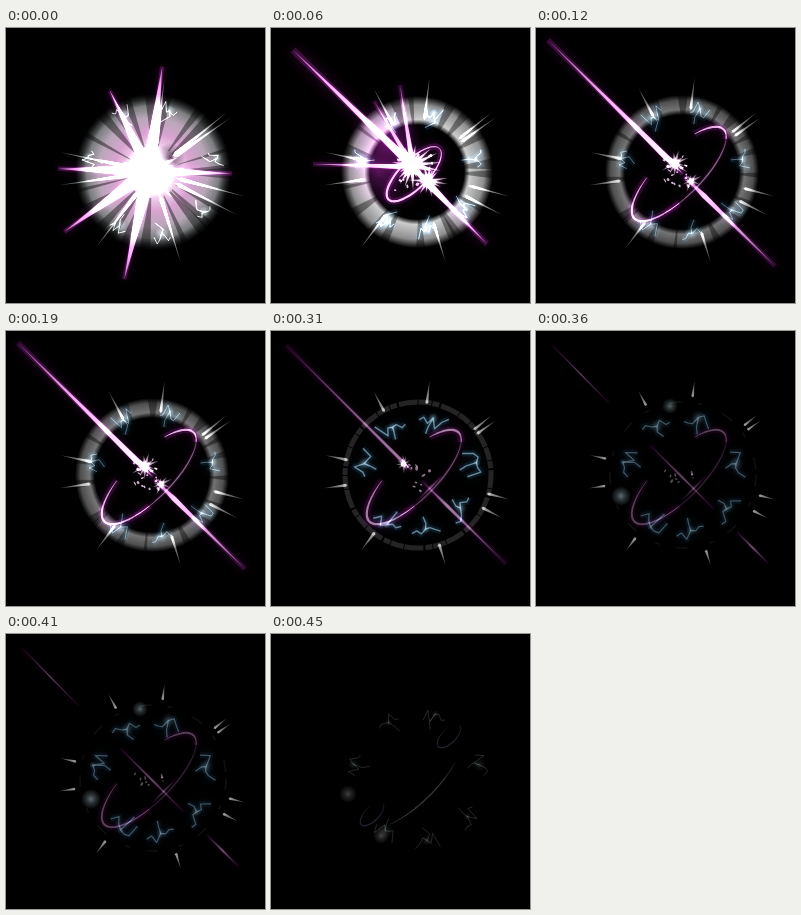
An HTML page with a canvas for the animation above (540 ms loop, 259 by 275 pixels).

```html
<!DOCTYPE html>
<html>
<head>
<meta charset="utf-8">
<title>Energy burst</title>
<style>
html, body { margin: 0; width: 100%; height: 100%; overflow: hidden; background: #000; }
canvas { display: block; width: 259px; height: 275px; }
</style>
</head>
<body>
<canvas id="stage" width="259" height="275"></canvas>
<script>
const c = document.getElementById('stage').getContext('2d');
const TAU = Math.PI * 2, CX = 147, CY = 144;
const LOOP = 540, STARTS = [0, 60, 120, 240, 360, 450];
const WHITE = '255,255,255', PALE = '255,232,252', PINK = '225,120,215';
const PURPLE = '120,25,120', BLUE = '35,85,120', STEEL = '185,215,225', GREY = '150,150,155';
const NEEDLES = [-83, -118, -39, -35, 15, 27, 73, 127, 172, 192];
const BOLTS = [-118, -75, -168, -12, 38, 82, 122];
let seed = 1;

const rnd = () => (seed = (seed * 16807) % 2147483647) / 2147483647;
const jit = s => (rnd() - 0.5) * s;
const rgba = (rgb, a) => `rgba(${rgb},${a})`;
const polar = (deg, r) => [CX + r * Math.cos(deg * TAU / 360), CY + r * Math.sin(deg * TAU / 360)];

function glow(rgb, size, a) {
  c.shadowColor = rgba(rgb, a);
  c.shadowBlur = size;
}

function radial(x, y, r, stops) {
  const g = c.createRadialGradient(x, y, 0, x, y, r);
  for (const [at, rgb, a] of stops) g.addColorStop(at, rgba(rgb, a));
  c.fillStyle = g;
  c.beginPath();
  c.arc(x, y, r, 0, TAU);
  c.fill();
}

const blob = (x, y, r, a, rgb = STEEL) =>
  radial(x, y, r, [[0, rgb, a], [0.4, rgb, a * 0.5], [1, rgb, 0]]);

// Blade from a to b, widest at fraction k and faded towards both tips
function blade(ax, ay, bx, by, k, w, rgb, a, tip) {
  const dx = bx - ax, dy = by - ay, len = Math.hypot(dx, dy);
  const mx = ax + dx * k, my = ay + dy * k;
  const nx = -dy / len * w / 2, ny = dx / len * w / 2;
  const g = c.createLinearGradient(ax, ay, bx, by);
  g.addColorStop(0, rgba(rgb, a * tip));
  g.addColorStop(k, rgba(rgb, a));
  g.addColorStop(1, rgba(rgb, a * tip));
  c.fillStyle = g;
  c.beginPath();
  c.moveTo(ax, ay);
  c.lineTo(mx + nx, my + ny);
  c.lineTo(bx, by);
  c.lineTo(mx - nx, my - ny);
  c.fill();
}

function beam(ax, ay, bx, by, k, w, a, halo) {
  glow(PURPLE, halo, 1);
  c.strokeStyle = rgba(PURPLE, a * 0.4);
  c.lineWidth = halo * 0.5;
  c.beginPath();
  c.moveTo(ax, ay);
  c.lineTo(bx, by);
  c.stroke();
  glow(PINK, 2, a * 0.5);
  blade(ax, ay, bx, by, k, w, PALE, a, 0.4);
  c.shadowBlur = 0;
}

function needles(root, a, w) {
  for (const deg of NEEDLES)
    blade(...polar(deg, root), ...polar(deg, 95), 0.08, w, WHITE, a, 0.35);
}

// Jagged arcs around radius r, each with one fork
function bolts(r, sweep, a, rgb, halo, w) {
  c.lineJoin = 'round';
  for (const deg of BOLTS) {
    const path = new Path2D(), mid = polar(deg, r + jit(8));
    for (let i = -3; i <= 3; i++)
      path.lineTo(...(i ? polar(deg + i * sweep / 6, r + jit(16)) : mid));
    path.moveTo(...mid);
    path.lineTo(...polar(deg + jit(8), r - 8));
    path.lineTo(...polar(deg + jit(14), r - 15));
    if (halo) {
      glow(halo, 8, 1);
      c.strokeStyle = rgba(halo, a * 0.4);
      c.lineWidth = 6;
      c.stroke(path);
    }
    c.shadowBlur = 0;
    c.strokeStyle = rgba(rgb, a);
    c.lineWidth = w;
    c.stroke(path);
    blob(...mid, 3 + rnd() * 5, a * 0.7);
  }
}

// Tilted ellipse arc whose line swells in the middle
function orbit(rx, ry, from, to, a, w, rgb = PALE, halo = PURPLE, x = 143, y = 146) {
  const arc = (p, q) => {
    c.beginPath();
    c.ellipse(x, y, rx, ry, -Math.PI / 4, p, q);
    c.stroke();
  };
  glow(halo, 10, 1);
  c.strokeStyle = rgba(halo, a * 0.4);
  c.lineWidth = w * 3;
  arc(from, to);
  c.shadowBlur = 0;
  c.strokeStyle = rgba(rgb, a);
  const n = 40, step = (to - from) / n;
  for (let i = 0; i < n; i++) {
    c.lineWidth = w * (0.3 + 0.7 * Math.sin(Math.PI * (i + 0.5) / n));
    arc(from + i * step, from + (i + 1) * step);
  }
}

function orbits(a, w, thin) {
  orbit(63, 22, 1.9, 4.3, a, w);
  orbit(63, 22, 0.3, 2.2, a * thin, w * 0.6);
  orbit(63, 22, -0.9, 0.4, a, w);
}

// Dark wedges between two radii
function shade(n, r0, r1, a) {
  c.globalCompositeOperation = 'source-over';
  c.fillStyle = rgba('0,0,0', a);
  for (let i = 0; i < n; i++) {
    const t = (i + rnd()) / n * TAU, d = 0.02 + rnd() * 0.06;
    c.beginPath();
    c.arc(CX, CY, r1, t - d, t + d);
    c.arc(CX, CY, r0, t + d / 2, t - d / 2, true);
    c.fill();
  }
  c.globalCompositeOperation = 'lighter';
}

function halo(inner, outer, a) {
  const k = inner / outer;
  radial(CX - 1, CY, outer, [[k - 0.05, WHITE, 0], [k + 0.02, WHITE, a],
    [0.35 * k + 0.65, WHITE, a * 0.7], [1, WHITE, 0]]);
  shade(18, inner - 4, outer + 2, 0.4);
}

function rim(a, w, dash) {
  c.strokeStyle = rgba(GREY, a);
  c.lineWidth = w;
  c.setLineDash(dash);
  c.beginPath();
  c.arc(CX, CY, 73, 0, TAU);
  c.stroke();
  c.setLineDash([]);
}

function burst(x, y, n, r, w, a) {
  glow(PINK, 3, a * 0.6);
  for (let i = 0; i < n; i++) {
    const t = (i + rnd() * 0.7) / n * TAU, d = r * (0.45 + rnd() * 0.55);
    blade(x, y, x + Math.cos(t) * d, y + Math.sin(t) * d, 0.2, w, WHITE, a, 0.5);
  }
  c.shadowBlur = 0;
}

function sparks(n, spread, a) {
  c.fillStyle = rgba('255,215,250', a);
  for (let i = 0; i < n; i++) {
    c.beginPath();
    c.ellipse(143 + jit(spread), 145 + jit(spread), 0.7 + rnd() * 1.6, 0.6 + rnd(), rnd() * 3, 0, TAU);
    c.fill();
  }
}

function flash() {
  radial(CX, CY, 78, [[0, WHITE, 1], [0.25, PALE, 1], [0.5, '228,172,220', 0.95],
    [0.7, '205,185,205', 0.9], [0.85, '165,168,170', 0.75], [1, '80,85,88', 0]]);
  shade(22, 26, 80, 0.42);
  c.globalCompositeOperation = 'source-over';
  blob(164, 130, 15, 0.8, '30,5,30');
  c.globalCompositeOperation = 'lighter';
  needles(24, 0.85, 4);
  for (const [deg, len] of [[-85, 106], [105, 111], [146, 107], [182, 95], [1, 79], [-118, 92]])
    beam(143, 143, ...polar(deg, len), 0.18, 12 * len / 106, 1, 9);
  burst(144, 143, 22, 36, 7, 1);
  bolts(66, 14, 0.6, WHITE, null, 1);
  blob(144, 143, 27, 1, WHITE);
}

function split() {
  halo(51, 76, 0.8);
  blob(114, 113, 38, 0.7, PURPLE);
  blob(108, 146, 34, 0.6, PURPLE);
  needles(52, 0.8, 3);
  bolts(60, 15, 0.5, WHITE, BLUE, 1);
  beam(22, 22, 149, 145, 0.87, 8, 1, 14);
  beam(145, 143, 216, 216, 0.18, 7, 1, 11);
  for (const [x, y] of [[42, 136], [129, 57], [103, 73]])
    beam(142, 139, x, y, 0.15, 5, 0.85, 9);
  orbit(36, 14, 0, TAU, 0.85, 2.2);
  burst(141, 137, 22, 30, 4, 1);
  burst(157, 153, 16, 22, 3, 0.9);
  blob(141, 137, 11, 1, WHITE);
  blob(157, 153, 6, 0.8, WHITE);
  sparks(14, 42, 0.9);
}

function spread() {
  halo(61, 77, 0.45);
  needles(62, 0.65, 3);
  bolts(64, 17, 0.4, STEEL, BLUE, 1);
  beam(12, 12, 147, 146, 0.88, 6, 0.85, 11);
  beam(148, 148, 239, 238, 0.22, 5, 0.75, 10);
  orbits(0.7, 2.2, 0.6);
  burst(139, 135, 13, 16, 3, 0.7);
  burst(155, 153, 10, 13, 2.5, 0.6);
  sparks(22, 34, 0.8);
}

function fade() {
  rim(0.24, 5, [13, 1, 7, 2, 19, 1]);
  needles(71, 0.65, 3);
  bolts(57, 28, 0.5, STEEL, BLUE, 1.4);
  beam(15, 14, 141, 140, 0.92, 3, 0.45, 8);
  beam(151, 150, 235, 233, 0.3, 3, 0.45, 8);
  orbits(0.5, 2.4, 0.6);
  beam(148, 168, 171, 145, 0.5, 2, 0.3, 5);
  burst(133, 133, 9, 10, 2.5, 0.5);
  sparks(13, 32, 0.55);
}

function dim() {
  rim(0.1, 1.5, [12, 16, 5, 22]);
  needles(78, 0.6, 2.6);
  beam(16, 14, 73, 72, 0.5, 1.2, 0.26, 4);
  beam(201, 201, 232, 232, 0.5, 2, 0.3, 5);
  bolts(58, 28, 0.32, STEEL, BLUE, 1.2);
  blob(134, 75, 8, 0.45);
  blob(85, 165, 10, 0.5);
  orbits(0.26, 2, 0.6);
  beam(114, 114, 178, 178, 0.5, 2, 0.28, 5);
  beam(146, 169, 170, 145, 0.5, 1.8, 0.2, 4);
  sparks(9, 28, 0.35);
}

function embers() {
  bolts(65, 20, 0.24, GREY, null, 1);
  orbit(63, 22, 0.86, 2.45, 0.34, 1.4, GREY, '0,0,0');
  for (const [x, y] of [[101, 180], [178, 102]])
    orbit(15, 7, 0, 5, 0.3, 1.3, '115,105,155', '0,0,0', x, y);
  blob(77, 160, 9, 0.42, GREY);
  blob(110, 202, 8, 0.42, GREY);
}

const SCENES = [flash, split, spread, fade, dim, embers];
let shown = -1;

function tick(now) {
  const t = now % LOOP;
  const i = STARTS.findLastIndex(s => s <= t);
  if (i !== shown) {
    shown = i;
    seed = 7100 + i * 3700;
    c.globalCompositeOperation = 'source-over';
    c.shadowBlur = 0;
    c.fillStyle = '#000';
    c.fillRect(0, 0, 259, 275);
    c.globalCompositeOperation = 'lighter';
    SCENES[i]();
  }
  requestAnimationFrame(() => tick(performance.now()));
}
tick(performance.now());
</script>
</body>
</html>
```
